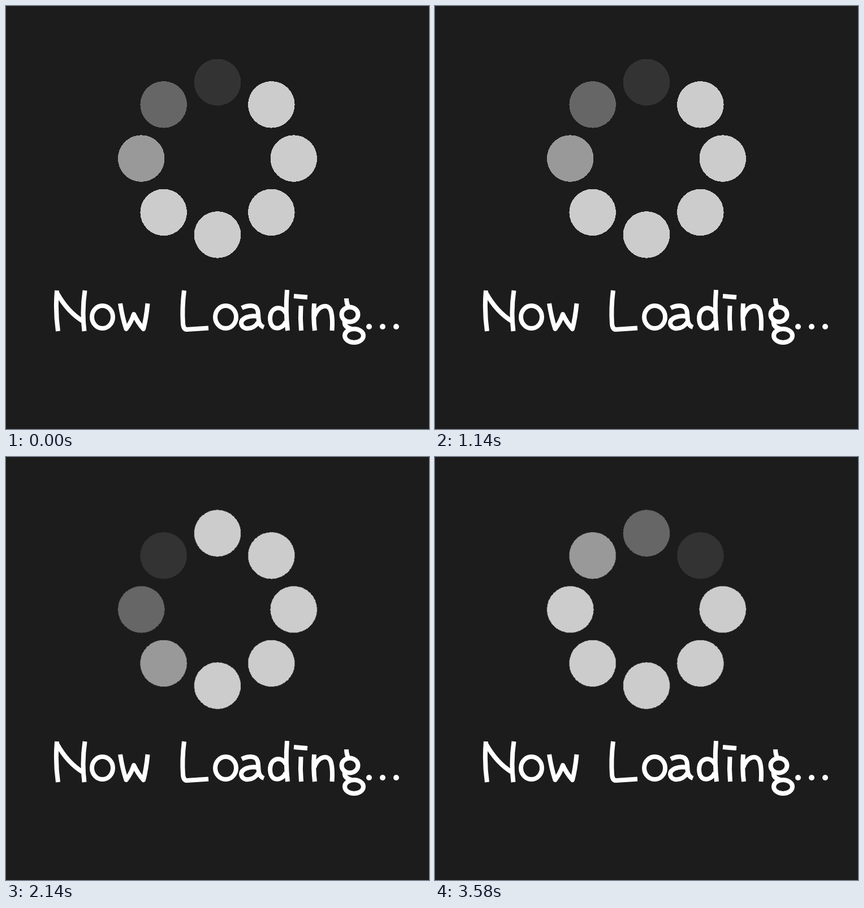
Write an HTML page that moves like this. It is 748 by 748 pixels and loops after 3620 ms.

```html
<!DOCTYPE html>
<html lang="en">
<head>
<meta charset="utf-8">
<title>Now Loading...</title>
<style>
  html, body { margin: 0; width: 100%; height: 100%; overflow: hidden; background: #1c1c1c; }
  svg { display: block; width: 100%; height: 100%; }
  .ring {
    fill: #ccc;
    shape-rendering: crispEdges;
    transform-origin: 374px 269.6px;
    animation: turn 3620ms -1ms infinite;
  }
  .word { fill: none; stroke: #fff; stroke-width: 8; stroke-linejoin: round; }
  .stops { fill: #fff; stroke: none; }

  /* Eighth turns every 140 ms, with a few 160 ms holds */
  @keyframes turn {
    0% { transform: rotate(0deg); animation-timing-function: steps(7); }
    27.0718% { transform: rotate(315deg); animation-timing-function: steps(1); }
    31.4917% { transform: rotate(360deg); animation-timing-function: steps(2); }
    39.2265% { transform: rotate(450deg); animation-timing-function: steps(1); }
    43.6464% { transform: rotate(495deg); animation-timing-function: steps(4); }
    59.1160% { transform: rotate(675deg); animation-timing-function: steps(1); }
    63.5359% { transform: rotate(720deg); animation-timing-function: steps(2); }
    71.2707% { transform: rotate(810deg); animation-timing-function: steps(1); }
    75.6906% { transform: rotate(855deg); animation-timing-function: steps(6); }
    98.8950%, 100% { transform: rotate(1125deg); animation-timing-function: steps(1); }
  }
</style>
</head>
<body>
<svg viewBox="0 0 748 748" role="img" aria-label="Now Loading...">
  <g class="ring">
    <circle cx="374" cy="134.8" r="41.3" fill="#333"/>
    <circle cx="469.3" cy="174.3" r="41.3"/>
    <circle cx="508.8" cy="269.6" r="41.3"/>
    <circle cx="469.3" cy="364.9" r="41.3"/>
    <circle cx="374" cy="404.4" r="41.3"/>
    <circle cx="278.7" cy="364.9" r="41.3"/>
    <circle cx="239.2" cy="269.6" r="41.3" fill="#999"/>
    <circle cx="278.7" cy="174.3" r="41.3" fill="#666"/>
  </g>
  <g class="word">
    <!-- N o w -->
    <path d="M92 575Q87 540 90 503M90 507C101 527 117 546 137 558M139.500 503Q134 540 138.500 575"/>
    <ellipse cx="170.500" cy="550" rx="18.500" ry="20"/>
    <path d="M202 526Q206 552 212.500 571Q221 560 226 545Q233 560 243 571Q248 552 250.500 526"/>
    <!-- L o a d -->
    <path d="M315 503Q311 535 313 562Q314 572 320 572L358 569.500"/>
    <ellipse cx="388.500" cy="550" rx="18.500" ry="20"/>
    <path d="M417 534C427 529 442 527 445 538C448 549 443 563 456 568M446 549C430 546 416 552 416 561C417 574 438 573 446 559"/>
    <path d="M497 502Q494 540 498 574M495 543C487 528 467.500 532 467 552C467 575 488 574 495 558"/>
    <!-- i n g -->
    <path d="M509 513L533 515M521.500 530Q520 552 522 574"/>
    <path d="M545 526Q543 550 546 574M545 549C552 529 571 524 575 541Q578 553 576.500 574"/>
    <path d="M602 517Q602 526 606 533"/>
    <ellipse cx="608" cy="545.500" rx="14.500" ry="13"/>
    <path d="M599 556Q597 568 611 571"/>
    <ellipse cx="615.500" cy="583" rx="16.500" ry="12"/>
    <g class="stops">
      <circle cx="642" cy="567" r="5"/>
      <circle cx="666" cy="567" r="5"/>
      <circle cx="690" cy="567" r="5"/>
    </g>
  </g>
</svg>
</body>
</html>
```
